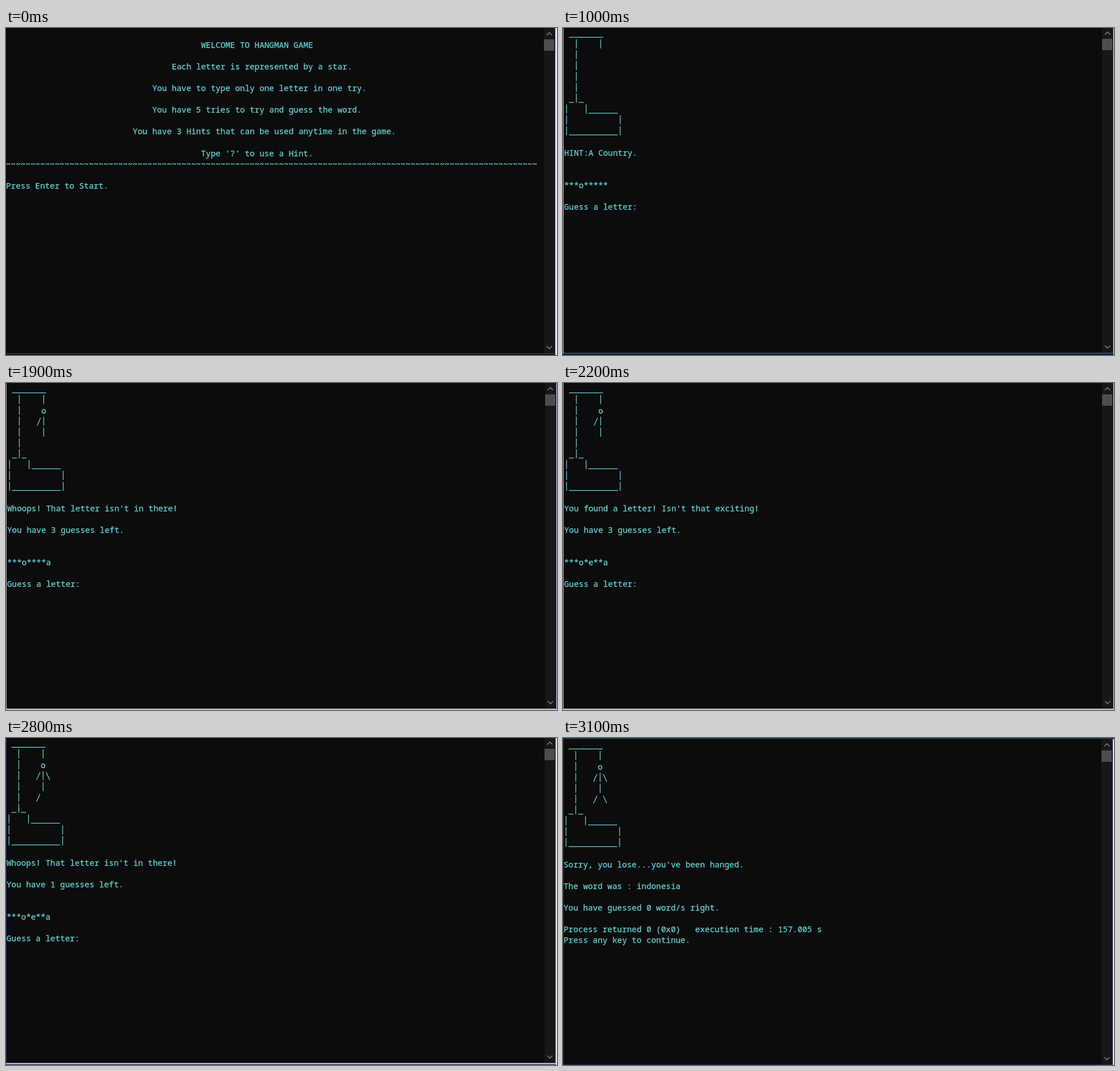
These frames come from a looping animation (972x576 px, 3400 ms). An HTML page:

```html
<!DOCTYPE html>
<html lang="en">
<head>
<meta charset="utf-8">
<title>Hangman</title>
<style>
  html, body { margin: 0; width: 100%; height: 100%; overflow: hidden; background: #0c0c0c; }
  svg { display: block; width: 972px; height: 576px; }
  text {
    font: 14.333px "Noto Sans Mono", "DejaVu Sans Mono", monospace;
    fill: #61d6d6;
    stroke: #61d6d6;
    stroke-width: 0.25;
    white-space: pre;
  }
  .strokes { fill: none; stroke: #61d6d6; stroke-width: 1.25; }
  .arrow { fill: none; stroke: #858585; stroke-width: 1.5; }
  .screen { visibility: hidden; animation: turn 3400ms step-end infinite; }
  .screen:first-child { animation-name: intro; }
  @keyframes intro {
    0% { visibility: visible; }
    29.413%, 100% { visibility: hidden; }
  }
  @keyframes turn {
    0% { visibility: visible; }
    8.825%, 100% { visibility: hidden; }
  }
</style>
</head>
<body>
<svg id="stage" viewBox="0 0 972 576" xmlns="http://www.w3.org/2000/svg"></svg>
<script>
const LOOP = 3400, CELL = 8.6, LINE = 19.1, BASE = 14.4;
const stage = document.getElementById('stage');

function add(parent, tag, attrs, text) {
  const el = document.createElementNS('http://www.w3.org/2000/svg', tag);
  for (const key in attrs) el.setAttribute(key, attrs[key]);
  if (text) el.textContent = text;
  parent.appendChild(el);
  return el;
}

function rect(parent, x, y, width, height, fill) {
  add(parent, 'rect', { x, y, width, height, fill });
}

// Line-drawing characters, placed from the left end of the baseline of their cell.
const pens = {
  '|': (x, y) => `M${x + CELL / 2} ${y - 13.4}v16`,
  '_': (x, y) => `M${x} ${y + 2}h${CELL}`,
  '/': (x, y) => `M${x + 7.4} ${y - 11.2}l-6.2 13.4`,
  '\\': (x, y) => `M${x + 1.2} ${y - 11.2}l6.2 13.4`
};

function drawRow(parent, row, line, dx, dy) {
  const y = BASE + LINE * row + dy;
  let words = line;
  if (/^[ |_\/\\o]+$/.test(line)) {
    const d = [...line].map((ch, col) => pens[ch] ? pens[ch](dx + col * CELL, y) : '').join('');
    add(parent, 'path', { class: 'strokes', d });
    words = line.replace(/[^o]/g, ' ');
  }
  const lead = words.search(/\S/);
  if (lead >= 0) add(parent, 'text', { x: dx + lead * CELL, y }, words.slice(lead).trimEnd());
}

function drawWindow(g, { dx, dy, top, left, right, bottom, below }) {
  rect(g, 0, 0, 972, 576, '#0c0c0c');
  const x = 949 + dx;
  rect(g, x, 0, 19, 573 + dy, '#171717');
  rect(g, x, 19 + dy, 18, 20, '#4d4d4d');
  add(g, 'path', { class: 'arrow', d: `M${x + 5} ${11.5 + dy}l4.5 -4.5 4.5 4.5` });
  add(g, 'path', { class: 'arrow', d: `M${x + 5} ${559.5 + dy}l4.5 4.5 4.5 -4.5` });

  rect(g, 0, 572 + dy, 972, 1, bottom);
  if (below) rect(g, 0, 573 + dy, 972, 2, below);
  rect(g, 968 + dx, 0, 1, 573 + dy, right);
  rect(g, 969 + dx, 0, 3, 576, '#e4e5f2');
  if (left) rect(g, 0, 0, 1, 573 + dy, left);
  if (top) rect(g, 0, 0, 972, 2, top);
}

function gallows(lives) {
  const part = (ch, limit) => lives < limit ? ch : ' ';
  return [
    ' _______',
    '  |    |',
    '  |    ' + part('o', 5),
    '  |   ' + part('/', 4) + part('|', 5) + part('\\', 3),
    '  |    ' + part('|', 5),
    '  |   ' + part('/', 2) + ' ' + part('\\', 1),
    ' _|_',
    '|   |______',
    '|          |',
    '|__________|',
    ''
  ];
}

const hit = "You found a letter! Isn't that exciting!";
const miss = "Whoops! That letter isn't in there!";

function guess(message, lives, word) {
  return [...gallows(lives), message, '', `You have ${lives} guesses left.`,
    '', '', word, '', 'Guess a letter:'];
}

const at = (col, text) => ' '.repeat(col) + text;
const intro = [
  '', at(40, 'WELCOME TO HANGMAN GAME'),
  '', at(34, 'Each letter is represented by a star.'),
  '', at(30, 'You have to type only one letter in one try.'),
  '', at(30, 'You have 5 tries to try and guess the word.'),
  '', at(26, 'You have 3 Hints that can be used anytime in the game.'),
  '', at(40, "Type '?' to use a Hint."),
  '~'.repeat(109),
  '', 'Press Enter to Start.'
];
const hint = [...gallows(5), 'HINT:A Country.', '', '', '***o*****', '', 'Guess a letter:'];
const lost = [
  ...gallows(0),
  "Sorry, you lose...you've been hanged.",
  '', 'The word was : indonesia',
  '', 'You have guessed 0 word/s right.',
  '', 'Process returned 0 (0x0)   execution time : 157.005 s',
  'Press any key to continue.'
];

const navy = '#1c3157', pale = '#c4c4c8', blue = '#6076b8', grey = '#55555a';
const screens = [
  { start: 0, lines: intro, dx: 0, dy: 1, right: navy, bottom: grey },
  { start: 1000, lines: hint, dx: 2, dy: 0, left: pale, right: grey, bottom: grey, below: navy },
  { start: 1300, lines: guess(hit, 5, '***o****a'), dx: 2, dy: 3, top: navy, left: pale, right: navy, bottom: navy },
  { start: 1600, lines: guess(miss, 4, '***o****a'), dx: 2, dy: 1, left: pale, right: navy, bottom: grey, below: pale },
  { start: 1900, lines: guess(miss, 3, '***o****a'), dx: 2, dy: 1, left: pale, right: navy, bottom: grey, below: pale },
  { start: 2200, lines: guess(hit, 3, '***o*e**a'), dx: 2, dy: 1, left: pale, right: navy, bottom: grey, below: pale },
  { start: 2500, lines: guess(miss, 2, '***o*e**a'), dx: 1, dy: 1, left: navy, right: navy, bottom: grey, below: pale },
  { start: 2800, lines: guess(miss, 1, '***o*e**a'), dx: 1, dy: 0, left: navy, right: blue, bottom: blue, below: '#b4bce0' },
  { start: 3100, lines: lost, dx: 1, dy: 3, top: navy, left: navy, right: navy, bottom: navy }
];

for (const screen of screens) {
  const g = add(stage, 'g', { class: 'screen' });
  g.style.animationDelay = (screen.start ? screen.start - LOOP : 0) + 'ms';
  drawWindow(g, screen);
  screen.lines.forEach((line, row) => drawRow(g, row, line, screen.dx, screen.dy));
}
</script>
</body>
</html>
```
